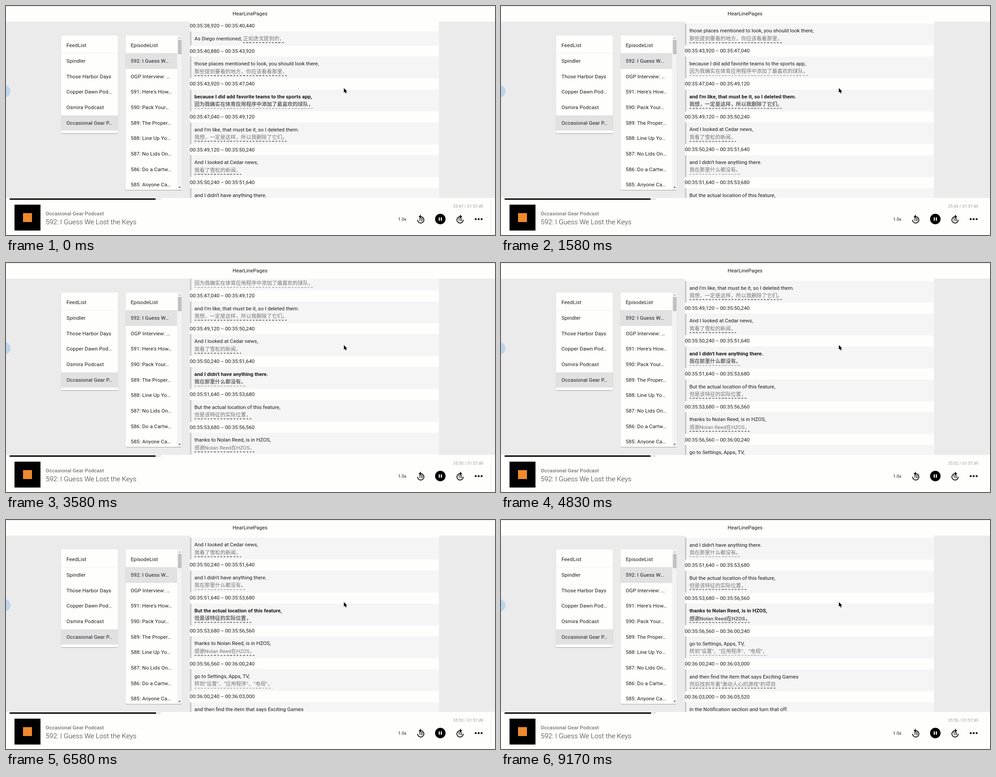
These frames come from a looping animation (1092x513 px, 9.34 s). An HTML page:

```html
<!DOCTYPE html>
<html lang="zh-CN">
<head>
<meta charset="utf-8">
<title>HearLinePages</title>
<style>
html, body { margin: 0; width: 100%; height: 100%; overflow: hidden; }
body {
  position: relative; background: #ebebeb; color: #1c1c1c;
  font: 11.556px/17.33px Roboto, "Noto Sans CJK SC", "Noto Sans CJK", sans-serif;
}
div, svg { position: absolute; white-space: nowrap; box-sizing: border-box; }
#head { left: 0; top: 0; width: 1092px; height: 35px; background: #fefefd; border-top: 1px solid #dedede; }
#head div { left: 0; width: 1090px; top: 7.5px; text-align: center; }
#column { left: 410.5px; top: 35px; width: 556.5px; height: 395px; overflow: hidden; background: #fefefd; }
#roll { left: 0; top: -35px; width: 100%; }
.cue { left: 0; width: 100%; }
.time { left: 0; top: 4.2px; }
.quote { left: 0; top: 24.6px; width: 100%; background: #f5f5f6; border-left: 3.6px solid #c6c6ca; }
.line { left: 7.2px; top: 8px; }
.zh { color: #767676; }
.zh::after {
  content: ""; position: absolute; left: 0; right: 0; top: 16.5px; height: 1.5px;
  background: repeating-linear-gradient(90deg, #747474 0 4.33px, transparent 4.33px 7.22px);
}
.on .line { font-weight: 700; }
.on .zh { color: #666; }
.card {
  top: 65.5px; width: 126.5px; background: #fefefd; border-radius: 3px; overflow: hidden; letter-spacing: .108px;
  box-shadow: 0 1.4px .7px -.7px rgba(0,0,0,.2), 0 .7px .7px rgba(0,0,0,.14), 0 .7px 2px rgba(0,0,0,.12);
}
.item { left: 0; height: 34.67px; line-height: 34.67px; padding-left: 11.7px; }
.item.first { border-bottom: 1px solid #efefef; }
.item.pick { background: #e1e1e1; }
#player { left: 0; top: 430px; width: 1092px; height: 83px; background: #fefefd; }
#edge { left: 1083px; top: 4px; width: 1px; height: 79px; background: #efefef; }
.bar { left: 7.5px; top: 1px; height: 3px; }
#cover { left: 19px; top: 15px; width: 58px; height: 58px; background: #000; }
#mark { left: 19px; top: 19px; width: 20px; height: 20px; background: #f08a2c; }
#show { left: 88.5px; top: 27px; font-weight: 500; color: #777; }
#title { left: 88.5px; top: 44px; line-height: 20px; font-size: 15.4px; font-weight: 300; color: #333; }
#clock { right: 26px; top: 10.5px; font-size: 8.67px; letter-spacing: .289px; color: #999; }
#rate { left: 875.5px; top: 38.5px; font-size: 9.9px; }
#blob { left: -18px; top: 177px; width: 28px; height: 28px; border-radius: 50%; background: #bdd5ec; }
svg { left: 0; top: 0; }
</style>
</head>
<body>
<div id="head"><div>HearLinePages</div></div>
<div id="blob"></div>
<div id="column"><div id="roll"></div></div>
<div id="player">
  <div id="edge"></div>
  <div class="bar" style="width:338.5px;background:#e2e2e2"></div>
  <div class="bar" id="done" style="background:#000"></div>
  <div id="cover"><div id="mark"></div></div>
  <div id="show">Occasional Gear Podcast</div>
  <div id="title">592: I Guess We Lost the Keys</div>
  <div id="clock"></div>
  <div id="rate">1.0x</div>
</div>
<svg width="1092" height="513" viewBox="0 0 1092 513">
  <defs>
    <g id="turn">
      <path d="M0-6.6A7.1 7.1 0 1 1-7.1.4" fill="none" stroke="#111" stroke-width="1.9"/>
      <path d="M.3-11.3V-2L-4.6-6.6Z" fill="#111"/>
    </g>
  </defs>
  <g font-size="8.2" font-weight="700" text-anchor="middle" fill="#111">
    <use href="#turn" transform="translate(926.2 478.6)"/>
    <text x="926.2" y="481.6">10</text>
    <use href="#turn" transform="translate(1014 478.6) scale(-1 1)"/>
    <text x="1014" y="481.6">10</text>
  </g>
  <circle cx="969.9" cy="477.2" r="11.7"/>
  <path d="M966.4 473.4h2.4v7.6h-2.4zM971 473.4h2.4v7.6h-2.4z" fill="#fff"/>
  <circle cx="1048.9" cy="477.4" r="2.2"/>
  <circle cx="1055.5" cy="477.4" r="2.2"/>
  <circle cx="1062.1" cy="477.4" r="2.2"/>
  <path d="M754.2 183.2V194.6L756.8 192.6 758.6 196.2 760.9 195.2 759.4 191.8H762.4Z"
    stroke="#fff" stroke-width=".6" stroke-linejoin="round"/>
</svg>
<script>
const LOOP = 9340, PITCH = 73.67, SHORT = 56.33, SCROLL = 500;
const START = 47, SPEED = 0.955, LENGTH = 7069;

// end of each cue in seconds after 00:35:00, then its two lines
const cues = [
  [40.44, "As Diego mentioned, ", "正如迭戈提到的，"],
  [43.92, "those places mentioned to look, you should look there,", "那些提到要看的地方，你应该看看那里，"],
  [47.04, "because I did add favorite teams to the sports app,", "因为我确实在体育应用程序中添加了最喜欢的球队，"],
  [49.12, "and I'm like, that must be it, so I deleted them.", "我想，一定是这样，所以我删除了它们。"],
  [50.24, "And I looked at Cedar news,", "我看了雪松的新闻，"],
  [51.64, "and I didn't have anything there.", "我在那里什么都没有。"],
  [53.68, "But the actual location of this feature,", "但是该特征的实际位置，"],
  [56.56, "thanks to Nolan Reed, is in HZOS,", "感谢Nolan Reed在HZOS，"],
  [60.24, "go to Settings, Apps, TV,", "转到“设置”、“应用程序”、“电视”，"],
  [63, "and then find the item that says Exciting Games", "然后找到写着“激动人心的游戏”的项目"],
  [65.52, "in the Notification section and turn that off.", ""]
];

const $ = id => document.getElementById(id);
const pad = (n, w = 2) => String(n).padStart(w, "0");

function add(parent, cls, text = "", style = {}) {
  const el = document.createElement("div");
  el.className = cls;
  el.textContent = text;
  Object.assign(el.style, style);
  parent.append(el);
  return el;
}

function stamp(sec) {
  const ms = Math.round(sec * 1000);
  return `00:${35 + Math.floor(ms / 60000)}:${pad(Math.floor(ms / 1000) % 60)},${pad(ms % 1000, 3)}`;
}

function makeCard(left, height, rows, pick, width) {
  const card = add(document.body, "card", "", { left: left + "px", height: height + "px" });
  rows.forEach((text, i) => add(card, "item" + (i ? "" : " first") + (i === pick ? " pick" : ""), text,
    { top: 5.8 + i * 34.67 + "px", width: width + "px" }));
  return card;
}

makeCard(123.3, 219.8, ["FeedList", "Spindler", "Those Harbor Days", "Copper Dawn Pod…", "Osmira Podcast", "Occasional Gear P…"], 5, 126.5);
const list = makeCard(266.7, 346.5, ["EpisodeList", "592: I Guess W…", "OGP Interview: …", "591: Here's How…",
  "590: Pack Your…", "589: The Proper…", "588: Line Up Yo…", "587: No Lids On…", "586: Do a Cartw…", "585: Anyone Ca…"], 1, 115.8);
const box = (left, top, width, height, background, clipPath = "none") => add(list, "", "", {
  left: left + "px", top: top + "px", width: width + "px", height: height + "px", background, clipPath });
box(115.8, 0, 10.7, 346.5, "#f3f3f3");
box(117.3, 10.5, 8, 32, "#c1c1c1");
box(118.6, 4.2, 5, 3, "#a3a3a3", "polygon(50% 0, 100% 100%, 0 100%)");
box(118.6, 339.5, 5, 3, "#505050", "polygon(0 0, 100% 0, 50% 100%)");

let top0 = 32.3;
const nodes = cues.map(([end, en, zh], i) => {
  const begin = i === 0 ? 38.92 : i === 1 ? 40.88 : cues[i - 1][0];
  const cue = add($("roll"), "cue", "", { top: top0 + "px" });
  add(cue, "time", `${stamp(begin)} -- ${stamp(end)}`);
  const quote = add(cue, "quote", "", { height: (i ? 49.07 : 31.73) + "px" });
  const first = add(quote, "line", en, { whiteSpace: "pre" });
  if (zh) add(quote, "line zh", zh, i
    ? { top: "25.3px" }
    : { left: 7.2 + first.getBoundingClientRect().width + "px" });
  top0 += i ? PITCH : SHORT;
  return cue;
});

const ease = x => { x = Math.min(1, Math.max(0, x)); return x * x * (3 - 2 * x); };

// five pictures a second, held on a twelfth-of-a-second grid
function hold(t) {
  const at = n => Math.round(Math.round(n * 2.4) / 0.12) * 10;
  let n = Math.floor(t / 200) + 1;
  while (at(n) > t) n--;
  return n * 200;
}

function draw(ms) {
  const t = hold(ms), audio = START + SPEED * t / 1000;
  let shift = 0, now = 2;
  for (let i = 3; i < cues.length; i++) {
    const since = t - (cues[i - 1][0] - START) / SPEED * 1000;
    if (since < 0) break;
    now = i;
    shift += PITCH * ease(since / SCROLL);
  }
  nodes.forEach((el, i) => el.classList.toggle("on", i === now));
  $("roll").style.transform = `translateY(${-shift}px)`;
  $("clock").textContent = `35:${Math.round(audio)} / 01:57:49`;
  $("done").style.width = 1074 * (2100 + audio) / LENGTH + "px";
}

const origin = performance.now();
function tick() {
  draw((performance.now() - origin) % LOOP);
  requestAnimationFrame(tick);
}
tick();
</script>
</body>
</html>
```
